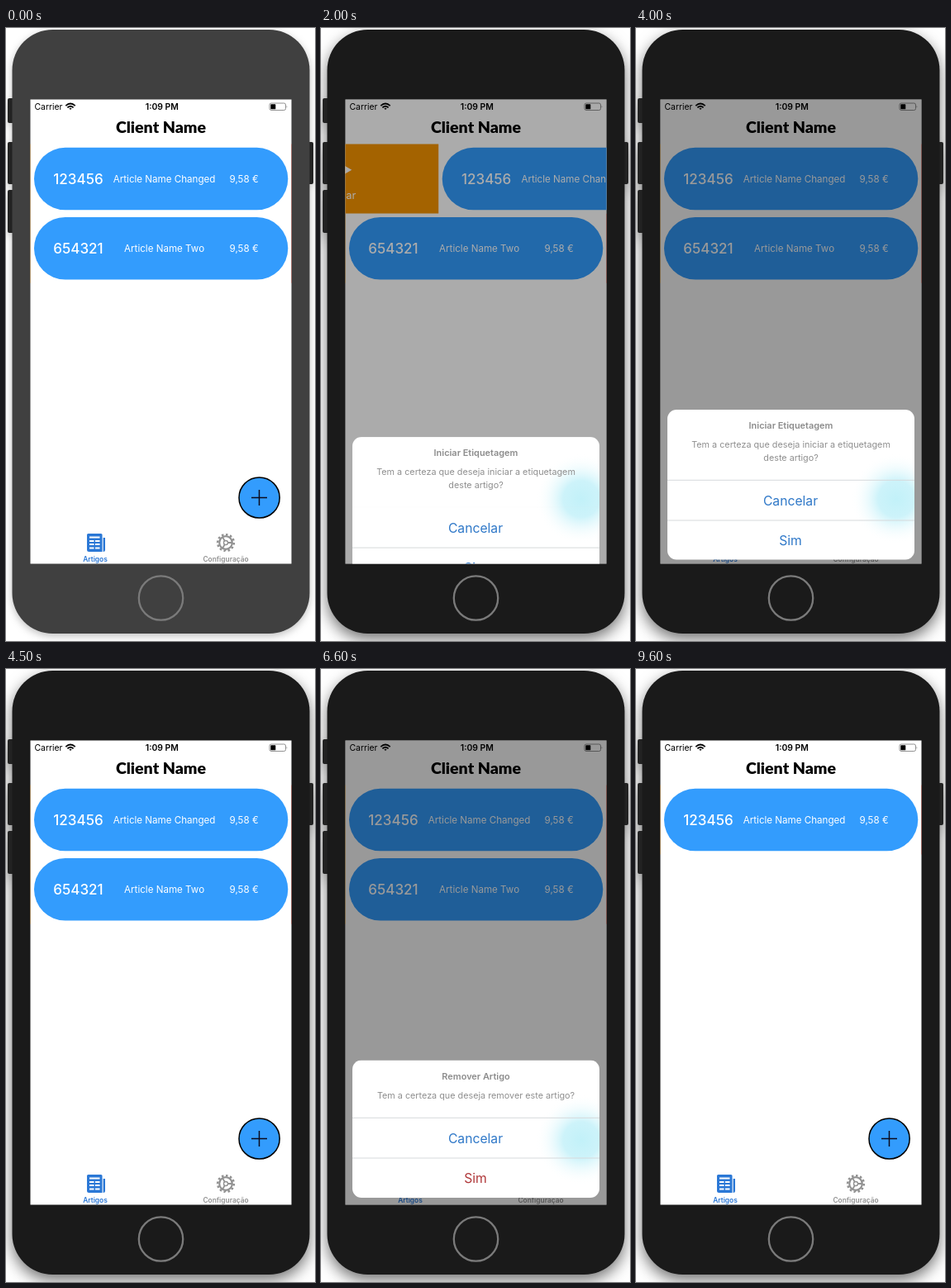
Recreate the animation shown at these times as an HTML page. Size 374 by 742 pixels, loop 9.7 s.

```html
<!DOCTYPE html>
<html lang="pt">
<head>
<meta charset="utf-8">
<title>Article list</title>
<style>
  html, body { margin: 0; height: 100%; overflow: hidden; background: #fff; }
  svg { display: block; width: 100%; height: 100%; }
  text { font-family: Inter, "Noto Sans", sans-serif; font-size: 11.6px; }
  .mid { text-anchor: middle; }
  .heading { font: 900 19.6px Lato, "Open Sans", sans-serif; }
  .status { font-size: 10.4px; }
  .tab { font-size: 8.4px; font-weight: 600; }
  .number { font-size: 17px; font-weight: 500; }
  .action { font-size: 12.8px; }
  .sheet-title { font-size: 10.95px; font-weight: 600; fill: #8c8c8c; }
  .sheet-body { font-size: 10.8px; fill: #8f8f8f; }
  .choice { font-size: 15.7px; }
  #device { filter: drop-shadow(0 3px 5px rgba(0,0,0,.25)); }
  #device.active { filter: drop-shadow(0 7px 9px rgba(0,0,0,.55)); }
  #device .case { fill: #404040; }
  #device.active .case { fill: #1a1a1a; }
</style>
</head>
<body>
<svg viewBox="0 0 374 742">
  <defs>
    <clipPath id="screenClip"><rect x="29.5" y="86.5" width="316" height="562"/></clipPath>
    <clipPath id="sheetClip"><rect id="sheetShape" x="38" width="299" rx="11"/></clipPath>
    <radialGradient id="glowFill">
      <stop offset="0" stop-color="#c2f1f9"/>
      <stop offset=".4" stop-color="#cdf3fa"/>
      <stop offset="1" stop-color="#fff" stop-opacity="0"/>
    </radialGradient>
  </defs>

  <g id="device">
    <g fill="#222">
      <rect x="2" y="85" width="8" height="30" rx="2"/>
      <rect x="2" y="138" width="8" height="51" rx="2"/>
      <rect x="2" y="196" width="8" height="52" rx="2"/>
      <rect x="364" y="138" width="8" height="51" rx="2"/>
    </g>
    <rect class="case" x="7.5" y="2" width="360" height="731" rx="49"/>
  </g>
  <circle cx="187.5" cy="690" r="26.7" fill="none" stroke="#7a7a7a" stroke-width="2.3"/>

  <g clip-path="url(#screenClip)">
    <rect x="29" y="86" width="317" height="563" fill="#fff"/>
    <text class="status" x="34.5" y="99">Carrier</text>
    <g fill="none" stroke="#000" stroke-width="1.8">
      <path d="M72.3 94.2Q78 88.8 83.7 94.2M74.4 96.4Q78 93 81.6 96.4"/>
      <path d="M76.4 97.3Q78 96 79.6 97.3L78 99z" fill="#000" stroke="none"/>
    </g>
    <text class="status mid" x="188.8" y="99" font-weight="600">1:09 PM</text>
    <rect x="319" y="91" width="19.5" height="8.5" rx="2" fill="none" stroke="#777" stroke-width=".8"/>
    <rect x="320.3" y="92.3" width="6" height="6" rx=".6"/>
    <path d="M339.7 93.8q1.4 1.5 0 3z" fill="#777"/>
    <text class="heading mid" x="187.5" y="127.3">Client Name</text>

    <g id="rows"></g>

    <g fill="none" stroke="#0b0a1c">
      <circle cx="306.6" cy="568.5" r="24.6" fill="#339cfd" stroke="#000" stroke-width="1.5"/>
      <path d="M297 568.5h19M306.5 559v19" stroke-width="1.5"/>
    </g>

    <g fill="#2b78d6">
      <path d="M99.5 612h15.5q1.5 0 1.5 1.5v20.5h-16q-2.5 0-2.5-2.500v-18q0-1.500 1.500-1.500z"/>
      <path d="M117.6 617h2.400v15q0 2-2.400 2z"/>
      <path d="M101 616.500h12.500M101 621h5.500M108 621h5.500M101 625h5.500M108 625h5.500M101 629.500h5.500M108 629.500h5.500" stroke="#fff" stroke-width="2"/>
      <text class="tab mid" x="108" y="645.500">Artigos</text>
    </g>
    <g transform="translate(266 623)" fill="none" stroke="#929292">
      <circle r="9.8" stroke-width="2.600" pathLength="24" stroke-dasharray="1"/>
      <circle r="7.800" stroke-width="2.200"/>
      <circle r="2.500" stroke-width="1.400"/>
      <path d="M2.500 0H7M-1.250 2.200L-3.500 6M-1.250-2.200L-3.500-6" stroke-width="1.800"/>
    </g>
    <text class="tab mid" x="266" y="645.500" fill="#929292">Configuração</text>

    <rect id="dim" x="29" y="86" width="317" height="563"/>
    <g id="sheet" clip-path="url(#sheetClip)">
      <rect x="38" width="299" height="182" fill="#fff"/>
      <circle id="glow" cx="315" r="55" fill="url(#glowFill)"/>
      <text class="sheet-title mid" id="sheetTitle" x="187.5" y="23"></text>
      <text class="sheet-body mid" id="line1" x="187.5" y="46.300"></text>
      <text class="sheet-body mid" id="line2" x="187.5" y="61.500"></text>
      <g id="choices">
        <path id="topRule" d="M38 85.300h299" stroke="#d6d9db"/>
        <path d="M38 134h299" stroke="#d6d9db"/>
        <text class="choice mid" x="187" y="115.600" fill="#2f78c8">Cancelar</text>
        <text class="choice mid" id="confirm" x="187" y="164">Sim</text>
      </g>
    </g>
  </g>
</svg>
<script>
const LOOP = 9700, OFFSCREEN = 649;
const $ = id => document.getElementById(id);

const ramp = (t, start, duration) => {
  const p = Math.min(1, Math.max(0, (t - start) / duration));
  return p * p * (3 - 2 * p);
};

const rowMarkup = ([number, name]) => `<g>
  <rect x="-300" width="329.5" height="84" fill="#f49300"/>
  <path d="M-75.500 31.300l-32-18.500v37z" fill="#fff"/>
  <text class="action" x="-70.500" y="66.500" text-anchor="end" fill="#fff">Iniciar</text>
  <rect x="345.5" width="330" height="84" fill="#e01b00"/>
  <path d="M431.500 15l34 34m0-34l-34 34" stroke="#fff" stroke-width="3.500"/>
  <text class="action mid" x="448.300" y="66.500" fill="#fff">Apagar</text>
  <rect x="34" y="4.300" width="307.300" height="75.500" rx="37.700" fill="#339cfd"/>
  <g fill="#fff">
    <text class="number" x="57.300" y="48.200">${number}</text>
    <text class="mid" x="191.600" y="46.200">${name}</text>
    <text x="270.500" y="46.200">9,58 €</text>
  </g></g>`;

$("rows").innerHTML = [["123456", "Article Name Changed"], ["654321", "Article Name Two"]]
  .map(rowMarkup).join("");
const rows = [...$("rows").children];

const startSheet = {
  title: "Iniciar Etiquetagem",
  lines: ["Tem a certeza que deseja iniciar a etiquetagem", "deste artigo?"],
  rest: 462, height: 181.5, shift: 0, color: "#2f78c8",
  opens: 1635, closes: 4000
};
const removeSheet = {
  title: "Remover Artigo",
  lines: ["Tem a certeza que deseja remover este artigo?", ""],
  rest: 473.5, height: 166.5, shift: -15.5, color: "#b0383a",
  opens: 5600, closes: 7770
};

function drawSheet(t) {
  const s = t < 4700 ? startSheet : removeSheet;
  const shown = ramp(t, s.opens, 500) - ramp(t, s.closes, 400);
  const y = OFFSCREEN + (s.rest - OFFSCREEN) * shown;
  $("dim").setAttribute("opacity", 0.4 * shown);
  $("sheet").setAttribute("transform", `translate(0 ${y})`);
  $("sheetShape").setAttribute("height", s.height);
  $("glow").setAttribute("cy", 570 - y);
  $("sheetTitle").textContent = s.title;
  $("line1").textContent = s.lines[0];
  $("line2").textContent = s.lines[1];
  $("choices").setAttribute("transform", `translate(0 ${s.shift})`);
  $("topRule").setAttribute("opacity", ramp(shown, 0.8, 0.2));
  $("confirm").setAttribute("fill", s.color);
}

function draw(t) {
  $("device").classList.toggle("active", t >= 1000);
  const offsets = [
    200 * (ramp(t, 1050, 550) - ramp(t, 1635, 800)),
    -191 * (ramp(t, 4800, 750) - ramp(t, 5600, 800))
  ];
  rows.forEach((row, i) =>
    row.setAttribute("transform", `translate(${offsets[i]} ${140.5 + 84.2 * i})`));
  rows[1].setAttribute("visibility", t < 8300 ? "visible" : "hidden");
  drawSheet(t);
}

const began = performance.now();
function tick() {
  draw((performance.now() - began) % LOOP);
  requestAnimationFrame(tick);
}
tick();
</script>
</body>
</html>
```
